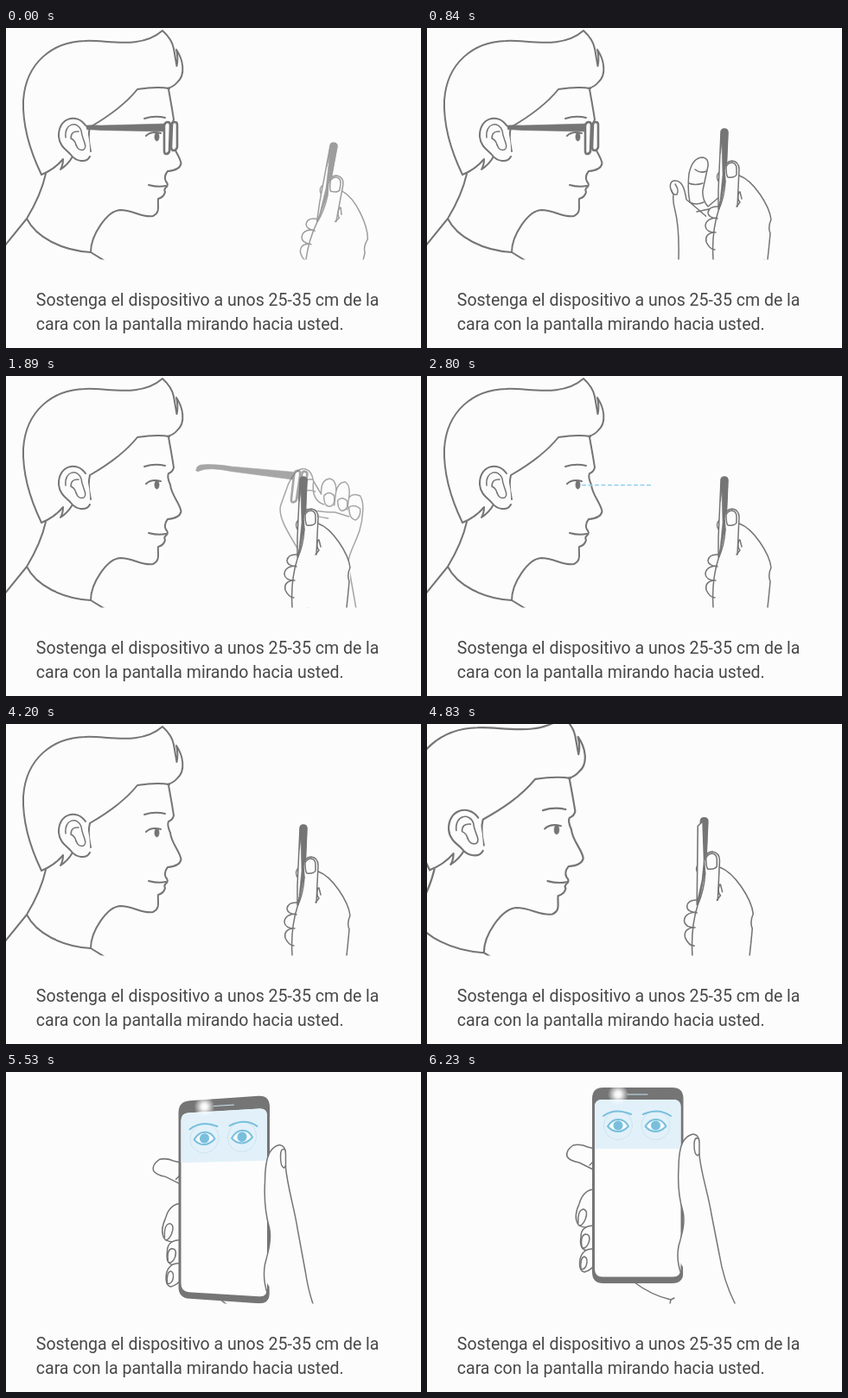
An HTML page that plays this animation: 480x371 px, repeating every 6.3 s.

```html
<!DOCTYPE html>
<html lang="es">
<head>
<meta charset="utf-8">
<title>Sostenga el dispositivo</title>
<style>
html, body { margin: 0; width: 100%; height: 100%; overflow: hidden; background: #fcfcfc; }
svg { display: block; width: 480px; height: 371px; }
path { fill: none; stroke: #757575; stroke-width: 1.5; stroke-linecap: round; stroke-linejoin: round; }
#man path { stroke-width: 2; }
#man #pinch path { stroke-width: 1.5; }
path.bg { fill: #fcfcfc; }
path.skin { fill: #fcfcfc; stroke: none; }
path.dark, #man path.dark { fill: #757575; stroke-width: .6; }
#man path.lens { fill: #fcfcfc; stroke-width: 2.6; }
path.flat { stroke: none; }
path.blue { stroke: #79bfdd; stroke-width: 2; }
path.ring { stroke: #cbe4f0; stroke-width: 1; }
text { font: 19.53px Roboto, Arial, sans-serif; fill: #484848; }
</style>
</head>
<body>
<svg viewBox="0 0 480 371">
<defs>
  <clipPath id="scene"><path d="M0 0H480V268.5H0Z"/></clipPath>
  <radialGradient id="shine">
    <stop offset="0" stop-color="#fff"/>
    <stop offset=".3" stop-color="#fff" stop-opacity=".9"/>
    <stop offset="1" stop-color="#fff" stop-opacity="0"/>
  </radialGradient>
</defs>
<g clip-path="url(#scene)">
  <g id="man">
    <path d="M41 170C28 143 19 113 20 84C23 40 54 16 91 15C115 13 155 26 181 3Q192 13 194 24L197.500 44Q199.500 35 197 25C204.500 36 208.500 54 198 63Q194 68 187 70"/>
    <path d="M189 70C177 68 165 69 152 71C136 91 116 104 97 115C94 127 97 138 98 143"/>
    <path d="M41 170Q56 164 66 152Q66 159 63 164Q72 158 77 149"/>
    <path d="M46 169C42 187 33 206 24 221L-40 300M24 221C35 243 65 258 98 260L124 276"/>
    <path d="M98 260C98 240 117 212 132 211C148 211 156 220 170 218C179 214 175 206 176 198Q183 196 184 190Q182 187 186 184Q188 181 185 178Q182 172 187 166Q201 165 202.500 157C201 147 191 138 190 126Q186 117 188 113Q193 111 194 106C192 93 190 82 188 71"/>
    <path d="M165 182Q176 185 185 183M160 105Q172 101 184 104M162 125Q168 119 179 122"/>
    <path class="dark" d="M174.500 121C178 121 178 131 174.500 131C171 131 171 121 174.500 121Z"/>
    <g id="pinch">
      <path class="bg" d="M242 290L239 268Q239 235 235 215C220 187 203 166 207 150L216 125Q226 105 236 108Q243 110 245 122L254 137Q253 120 264 119Q272 121 271 134Q274 122 282 123Q288 127 286 141Q291 135 299 139Q303 146 302 157C301 186 286 200 285 217L294 268L298 290Z"/>
      <path d="M232 122Q239 119 244 120M232 134Q240 131 247 134M245 122Q242 144 257 149M271 134L269 150M286 141L284 155M231 153Q251 158 270 158L286 163M231 153Q247 164 262 165"/>
      <path class="bg" d="M257 139Q263 132 269 139V146Q267 152 262 151Q257 150 257 139M273 144Q279 139 284 145V152Q281 157 277 156Q273 154 273 144M286 152Q293 148 299 154Q300 163 294 167Q286 166 286 152"/>
    </g>
    <g id="glasses">
      <path class="dark" d="M70 122Q69 117 75 115Q88 112 110 113L186 111V120L110 118.500Q84 116 74 122Q71 124 70 122Z"/>
      <path class="lens" d="M192 112Q192 109 195 109Q198 109 198 112V138Q197 142 194 142Q191 142 191 138Z"/>
      <path class="lens" d="M183 113Q184 109 187 109Q190 109 190 113L189 143Q188 146 185 146Q183 146 183 142Z"/>
    </g>
    <path class="skin" d="M92 113C82 98 60 104 61 126C62 138 71 142 75 147C81 155 93 157 97 149Q98 130 92 113Z"/>
    <path d="M92 113C82 98 60 104 61 126C62 138 71 142 75 147C81 155 93 157 97 149"/>
    <path style="stroke-width:1.5" d="M69 127C67 110 83 107 87 119C88 130 95 137 90 141Q83 143 81 135M84 120Q75 119 75 128Q80 130 81 136"/>
  </g>
  <g id="open">
    <path class="bg" d="M293 290L291 268Q292 232 287 212Q284 201 285 193C279 184 281 177 287 177C295 177 298 186 300 199L304 202Q301 188 303 169Q307 150 319 150Q326 151 325 160L319 188Q318 199 325 207L345 190L390 215V290"/>
    <path d="M283 188Q284 194 289 193Q292 188 287 181M303 180Q310 183 319 180M304 202Q311 206 320 202M304 202L327 222M312 213L335 208M310 164Q316 169 323 166"/>
  </g>
  <line id="gaze" x1="179" y1="126.500" y2="126.500" stroke="#8fcdf0" stroke-width="1.500" stroke-dasharray="5 2.500"/>
  <g id="side">
    <path class="skin" d="M338 168L360 172C378 177 396 206 398 222Q399 246 393 300H330Q331 280 331 258L323 245L323 215L337 207Z"/>
    <path class="bg" d="M338 167Q333 172 338 179"/>
    <path class="bg" d="M338 207Q326 206 325 214Q325 220 336 221M335 220Q322 221 322 230Q323 237 334 237M331 237Q321 239 323 248Q327 257 333 257"/>
    <path class="bg" d="M340 121Q340 117 344 117Q348 117 348 121L346 168L340 199L337 210L337 188Z"/>
    <path class="dark" d="M340 121Q340 117 344 117Q348 117 348 121L346 168L340 199L338 210L342 170L341 133L339.500 145Z"/>
    <path id="face" class="bg" d="M342.500 121L337 126L336 212L342 185L344 165Z"/>
    <path class="bg" d="M345 178L344 165Q345 154 353 154Q361 155 361 164L359 207"/>
    <path d="M346 161Q348 156 353 156Q358 157 358 163V170Q356 174 348 173Q346 171 346 161"/>
    <path d="M361 171C378 177 396 206 398 222Q394 231 397 238Q396 250 394 268V300M345 178Q344 196 337 212Q329 237 331 268V300M361 190Q358 198 362 202L358 207M362 190L364 198"/>
  </g>
  <g id="front"></g>
</g>
<text x="34.800" y="321.500">Sostenga el dispositivo a unos 25-35 cm de la</text>
<text x="34.800" y="349.500">cara con la pantalla mirando hacia usted.</text>
</svg>
<script>
const $ = id => document.getElementById(id);
const NS = 'http://www.w3.org/2000/svg';
const LOOP = 6300, STEP = 70;
const mix = (a, b, p) => a + (b - a) * p;
const clamp = v => Math.min(1, Math.max(0, v));
const ramp = (t, a, b) => clamp((t - a) / (b - a));
const smooth = p => p * p * (3 - 2 * p);

// Each key is [time, ...values]; values are blended linearly.
function track(t, keys) {
  let i = 0;
  while (i < keys.length - 2 && t > keys[i + 1][0]) i++;
  const a = keys[i], b = keys[i + 1], p = ramp(t, a[0], b[0]);
  return a.slice(1).map((v, n) => mix(v, b[n + 1], p));
}

function circle(x, y, r) {
  const c = r * .552;
  return `M${x - r} ${y}C${x - r} ${y - c} ${x - c} ${y - r} ${x} ${y - r}` +
    `C${x + c} ${y - r} ${x + r} ${y - c} ${x + r} ${y}` +
    `C${x + r} ${y + c} ${x + c} ${y + r} ${x} ${y + r}` +
    `C${x - c} ${y + r} ${x - r} ${y + c} ${x - r} ${y}Z`;
}

function box(x, y, X, Y, r) {
  return `M${x} ${y + r}Q${x} ${y} ${x + r} ${y}L${X - r} ${y}Q${X} ${y} ${X} ${y + r}` +
    `L${X} ${Y - r}Q${X} ${Y} ${X - r} ${Y}L${x + r} ${Y}Q${x} ${Y} ${x} ${Y - r}Z`;
}

const art = [];
function draw(d, cls = '', fill = '') {
  const el = document.createElementNS(NS, 'path');
  el.setAttribute('class', cls);
  if (fill) el.style.fill = fill;
  $('front').append(el);
  art.push([el, d]);
}

function eye(x) {
  draw(circle(x, 62, 16.5), 'ring');
  draw(`M${x - 12} 63Q${x - 7} 55 ${x} 55Q${x + 8} 55 ${x + 12} 63Q${x + 6} 69 ${x} 69Q${x - 7} 69 ${x - 12} 63Z`, 'blue', '#f4fafd');
  draw(circle(x, 62, 5.5), 'flat', '#79bfdd');
}

// Hand behind the phone
draw('M198 90L186 87Q178 83 169 85Q160 91 162 98Q165 103 176 105L198 116', 'bg');
draw('M188 108Q191 106 193 102');
draw('M196 136Q181 135 176 153Q169 168 175 177Q181 182 194 179', 'bg');
draw('M194 178Q178 178 178 191Q176 203 182 206Q190 209 196 205', 'bg');
draw('M194 205Q180 204 177 217Q175 230 182 232Q190 230 195 222', 'bg');
draw('M175 175Q174 160 181 159Q187 161 183 171Q180 178 176 178M179 203Q177 190 183 188Q190 188 187 198Q184 205 180 204M178 228Q177 215 182 214Q187 216 184 225Q181 230 178 228');
draw('M240 244Q260 259 282 264L281 269M282 264L286 262');
// Phone
draw(box(191, 18, 296.5, 245, 13), 'flat', '#757575');
draw(box(194, 32, 293.5, 237.5, 9), 'flat', '#fdfdfd');
draw('M194 89L194 40Q194 32 202 32L285 32Q293.5 32 293.5 40L293.5 89Z', 'flat', '#e2f1f9');
draw('M232 26L255 26', 'ring');
eye(221);
eye(264.5);
draw('M204 51Q217 41 236 49M250 49Q268 41 282 51', 'blue');
// Thumb and palm
draw('M296 226Q288 216 291 202C295 188 299 174 296 162C291 145 290 128 291 112Q291 91 296 81Q301 73 308 72Q315 73 315 82L315 96C317 118 325 140 329 165L338 211Q343 242 356 268L366 292L298 292Z', 'skin');
draw('M294 234Q288 218 291 202C295 188 299 174 296 162C291 145 290 128 291 112Q291 91 296 81Q301 73 308 72Q315 73 315 82L315 96C317 118 325 140 329 165L338 211Q343 242 356 268L366 292');
draw('M314 77Q309 75 309 84Q309 96 313 97L315 95');

const shine = document.createElementNS(NS, 'circle');
shine.setAttribute('r', 12);
shine.setAttribute('fill', 'url(#shine)');
$('front').append(shine);

// Turns the front view: k is the lean, w the share of the full width.
function warp(x, y, k, w) {
  const u = clamp((x - 191) / 105), v = clamp((y - 18) / 227);
  const dy = mix(mix(16, 17, v), mix(9, 24, v), u);
  const X = x < 296 ? 296 - Math.min(105, 296 - x) * w - Math.max(0, 191 - x) : x;
  return [X + k * 8.5, y + k * dy];
}

function place(id, alpha, transform) {
  const el = $(id);
  el.style.display = alpha > 0 ? '' : 'none';
  el.setAttribute('opacity', alpha);
  if (transform) el.setAttribute('transform', transform);
}

function render(t) {
  const [mx, my, sx, sy] = track(t, [[4550, 0, 0, 1, 1], [4830, -42, -11.7, 1.1, 1.065], [5180, -101, -17, 1.18, 1.14]]);
  place('man', 1 - ramp(t, 4900, 5180), `translate(${mx} ${my}) scale(${sx} ${sy})`);

  // Glasses and the hand that takes them share the last part of the path.
  const [pull] = track(t, [[1150, 0], [1400, 38], [1470, 46], [2100, 200]]);
  const lift = ramp(t, 1150, 1400);
  const gone = 1 - ramp(t, 1780, 2080);
  place('glasses', gone, `translate(${190 + pull} ${127 + lift}) rotate(${6.5 * lift}) translate(-190 -127)`);
  const [reach] = track(t, [[770, 30], [840, 0], [1050, -76]]);
  place('open', t >= 770 && t < 1050 ? 1 : 0, `translate(${reach} 0)`);
  const grab = t < 1150 ? mix(0, -38, ramp(t, 1050, 1150)) : pull - 38;
  place('pinch', t >= 1050 ? gone : 0, `translate(${grab} 0)`);

  place('gaze', t >= 2450 ? 1 - ramp(t, 3570, 4200) : 0);
  $('gaze').setAttribute('x2', Math.min(341, 261 + (t - 2800) * .218));

  const enter = 1 - smooth(ramp(t, 0, 700));
  const [hx, hy, hw, hh, turn] = track(t, [[4550, 0, 0, 1, 1, 0], [4830, -23, -5.5, 1.05, 1.06, 1], [5250, -58, -30, 1.15, 1.2, 3]]);
  place('side', mix(.7, 1, ramp(t, 0, 280)) * (1 - ramp(t, 5110, 5250)),
    `translate(${352 + 29 * enter + hx} ${163 + 17 * enter + hy}) rotate(${8 * enter}) scale(${hw} ${hh}) translate(-352 -163)`);
  place('face', turn, `translate(344 0) scale(${turn} 1) translate(-344 0)`);

  place('front', ramp(t, 5110, 5250));
  if (t < 5110) return;
  const k = 1 - smooth(ramp(t, 5530, 5880));
  const w = mix(.3, 1, smooth(ramp(t, 5110, 5530)));
  for (const [el, d] of art)
    el.setAttribute('d', d.replace(/([\d.]+) ([\d.]+)/g, (_, x, y) => warp(+x, +y, k, w).join(' ')));
  const [cx, cy] = warp(221, 26, k, w);
  shine.setAttribute('cx', cx);
  shine.setAttribute('cy', cy);
}

const start = performance.now();
function frame() {
  const t = (performance.now() - start) % LOOP;
  render(Math.floor(t / STEP) * STEP);
  requestAnimationFrame(frame);
}
frame();
</script>
</body>
</html>
```
